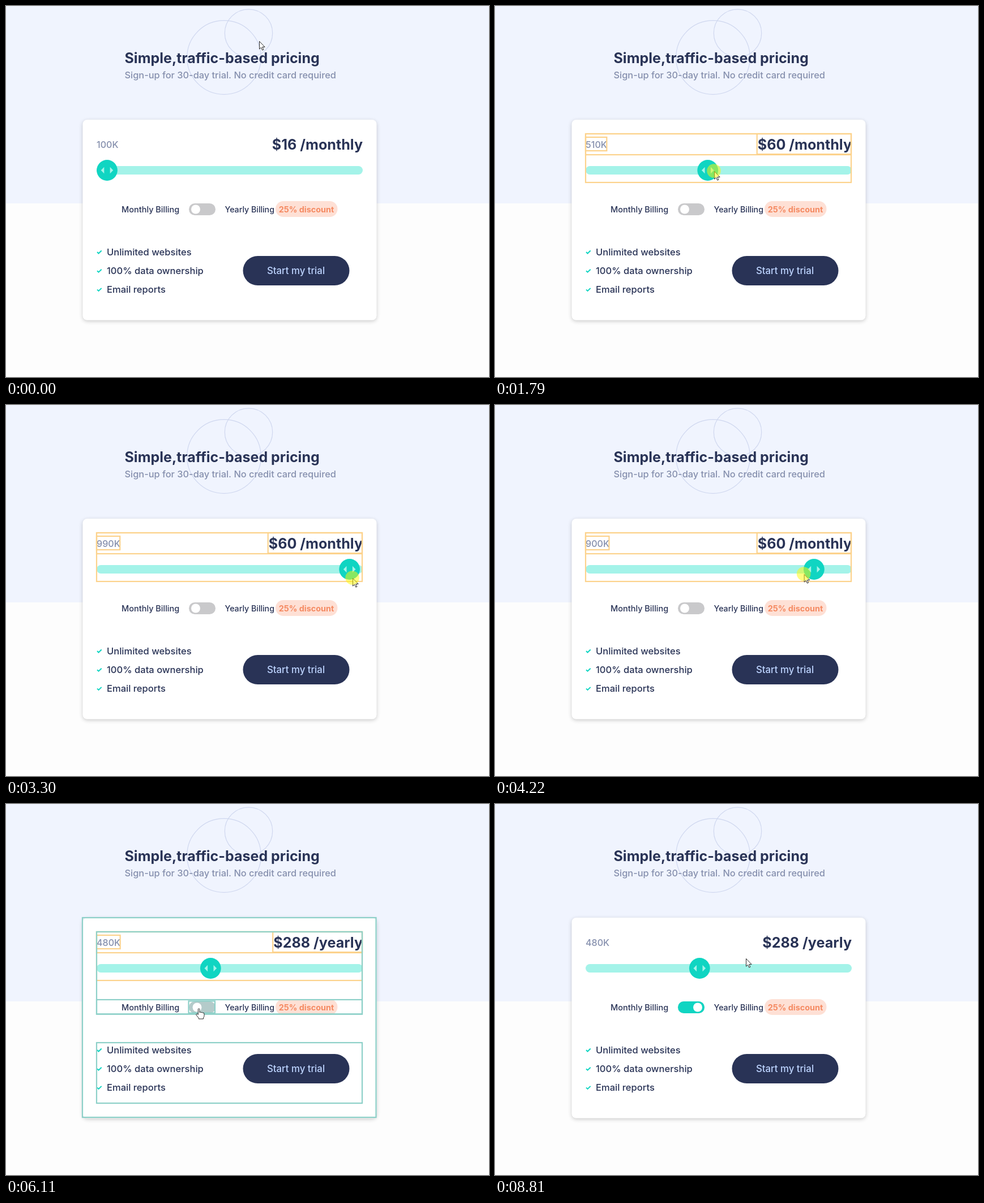
An HTML page with a canvas for the animation above (8.84 s loop, 853 by 656 pixels).

```html
<!DOCTYPE html>
<html lang="en">
<head>
<meta charset="utf-8">
<title>Pricing slider</title>
<style>
html, body { margin: 0; width: 100%; height: 100%; overflow: hidden; background: #fdfdfd; }
canvas { display: block; }
</style>
</head>
<body>
<canvas id="stage" width="853" height="656"></canvas>
<script>
const ctx = document.getElementById('stage').getContext('2d');
const LOOP = 8840;
const NAVY = '#293356', GREY = '#858fad', TEAL = '#10d5c2', PALE = '#a4f3e9';
const AMBER = '#fcd28c', MINT = '#8dd0c8';
const PRESS = 750, RELEASE = 5040, LAG = 55, CLEAR = 8690;
const CLICKS = [6070, 7160, 7740, 7990, 8240];

// pointer path: time, x, y
const PATH = [
  [0, 447, 62], [30, 447, 62], [150, 385, 112], [300, 242, 232], [440, 188, 287],
  [750, 188, 287], [1000, 217, 287], [1200, 257, 287], [1660, 365, 291], [1790, 387, 292],
  [1960, 387, 293], [2390, 513, 307], [2520, 516, 308], [2820, 562, 307],
  [3300, 612, 306], [3650, 632, 306], [3800, 632, 305], [4000, 612, 302],
  [4220, 546, 299], [4640, 400, 304], [4880, 376, 304], [4960, 376, 304], [5030, 362, 303],
  [5210, 362, 304], [5410, 340, 361], [8680, 340, 361], [8810, 443, 273]
];

const clamp = (v, a, b) => Math.min(b, Math.max(a, v));

function pointer(t) {
  let i = 1;
  while (i < PATH.length - 1 && PATH[i][0] < t) i++;
  const [t0, x0, y0] = PATH[i - 1], [t1, x1, y1] = PATH[i];
  const p = clamp((t - t0) / (t1 - t0), 0, 1);
  return [x0 + (x1 - x0) * p, y0 + (y1 - y0) * p];
}

function traffic(t) {
  if (t < PRESS) return 100;
  const x = t >= RELEASE ? 361.3 : pointer(t - LAG)[0];
  return clamp(Math.round((100 + (x - 178.5) / 0.4811) / 10) * 10, 100, 1000);
}

function toggleState(t) {
  const done = CLICKS.filter(c => c <= t);
  const on = done.length % 2 === 1;
  if (!done.length) return { on, pos: 0, lit: false };
  const since = t - done[done.length - 1];
  const p = clamp(since / 200, 0, 1);
  const e = p * p * (3 - 2 * p);
  return { on, pos: on ? e : 1 - e, lit: since < (done.length === 1 ? 360 : 265) };
}

function text(s, x, y, size, weight, color, align = 'left') {
  ctx.font = `${weight} ${size}px Inter, "Open Sans", sans-serif`;
  ctx.textAlign = align;
  ctx.fillStyle = color;
  ctx.fillText(s, x, y);
  return ctx.measureText(s).width;
}

function pill(x, y, w, h, r, color) {
  ctx.fillStyle = color;
  ctx.beginPath();
  ctx.roundRect(x, y, w, h, r);
  ctx.fill();
}

function disc(x, y, r, color) {
  ctx.fillStyle = color;
  ctx.beginPath();
  ctx.arc(x, y, r, 0, 7);
  ctx.fill();
}

function ring(x, y, r) {
  ctx.strokeStyle = '#cfd7ef';
  ctx.lineWidth = 1.2;
  ctx.beginPath();
  ctx.arc(x, y, r, 0, 7);
  ctx.stroke();
}

function frame(x0, y0, x1, y1, color) {
  ctx.strokeStyle = color;
  ctx.lineWidth = 2.2;
  ctx.strokeRect(x0, y0, x1 - x0, y1 - y0);
}

function poly(points, color) {
  ctx.fillStyle = color;
  ctx.beginPath();
  points.forEach(([x, y]) => ctx.lineTo(x, y));
  ctx.closePath();
  ctx.fill();
}

function page() {
  ctx.fillStyle = '#fdfdfd';
  ctx.fillRect(0, 0, 853, 656);
  ctx.fillStyle = '#f0f4fe';
  ctx.fillRect(0, 0, 853, 349);
  ring(385, 91, 65.3);
  ring(428.5, 48, 42.2);
  text('Simple,traffic-based pricing', 209.5, 101, 25, 700, NAVY);
  text('Sign-up for 30-day trial. No credit card required', 209.5, 128, 16.35, 450, GREY);

  ctx.save();
  ctx.shadowColor = 'rgba(0,0,0,.2)';
  ctx.shadowBlur = 7;
  ctx.shadowOffsetY = 2;
  pill(135.5, 201, 519, 354.5, 8, '#fff');
  ctx.restore();

  text('Monthly Billing', 204, 364.5, 14.5, 450, NAVY);
  text('Yearly Billing', 386.5, 364.5, 14.2, 450, NAVY);
  pill(476, 345, 109.5, 28, 14, '#fee0d5');
  text('25% discount', 530.5, 364.5, 14.4, 650, '#f58a62', 'center');

  ['Unlimited websites', '100% data ownership', 'Email reports'].forEach((s, i) => {
    const y = 435 + i * 33.2;
    ctx.strokeStyle = TEAL;
    ctx.lineWidth = 2;
    ctx.beginPath();
    ctx.moveTo(161, y);
    ctx.lineTo(163.5, y + 2.5);
    ctx.lineTo(168.7, y - 2.5);
    ctx.stroke();
    text(s, 178, y + 6, 16.55, 450, NAVY);
  });
  pill(418.5, 442, 188, 52, 26, NAVY);
  text('Start my trial', 512, 474, 16.8, 450, '#bdd4ff', 'center');
}

function slider(v) {
  const x = 178.5 + (v - 100) * 0.4811, y = 290.5;
  pill(160, 283, 470, 15, 7.5, PALE);
  disc(x, y, 18.4, TEAL);
  for (const s of [-1, 1])
    poly([[x + s * 10.8, y], [x + s * 5.2, y - 5.8], [x + s * 5.2, y + 5.8]], PALE);
}

function toggle(pos) {
  pill(323, 349, 47, 21, 10.5, '#c9c9cb');
  ctx.globalAlpha = pos;
  pill(323, 349, 47, 21, 10.5, TEAL);
  ctx.globalAlpha = 1;
  disc(335 + 23 * pos, 359.5, 8, '#fff');
}

const ARROW = new Path2D('M0 0V13.6L3.1 10.8L5.2 15.6L7.4 14.7L5.3 10H9.6Z');
const HAND = new Path2D('M-1.2 1Q0 -.8 1.4 1V7Q3 5.8 4.2 7.2Q5.8 6.2 7 7.8Q9.5 7 9.5 9.5V13' +
  'Q9.5 15 8 16.5V18.5H-.2V17L-4.6 11.4Q-5 9 -2.6 9.6L-1.2 11Z');

function cursor(shape, x, y) {
  ctx.save();
  ctx.translate(x + 0.5, y + 0.5);
  ctx.lineJoin = 'round';
  ctx.fillStyle = '#fff';
  ctx.strokeStyle = '#2a2a2a';
  ctx.lineWidth = 1;
  ctx.fill(shape);
  ctx.stroke(shape);
  ctx.restore();
}

function draw(t) {
  const v = traffic(t), sw = toggleState(t);
  const monthly = v < 250 ? 16 : v < 500 ? 32 : 60;
  const price = sw.on ? `$${monthly * 9} /yearly` : `$${monthly} /monthly`;
  page();
  const countW = text(v + 'K', 160, 251, 16.1, 450, GREY);
  const priceW = text(price, 630, 254, 25.1, 700, NAVY, 'right');
  slider(v);
  toggle(sw.pos);

  if (t >= PRESS && t < CLEAR) {
    frame(160, 226, 629, 312, AMBER);
    frame(160, 226, 629, 263, AMBER);
    frame(160, 232, 159.5 + countW, 256, AMBER);
    frame(629 - priceW, 226, 629, 262, AMBER);
  }
  if (sw.lit) {
    frame(135, 201, 653.5, 554, MINT);
    frame(160, 226, 629, 371.5, MINT);
    frame(160, 346, 629, 371.5, MINT);
    frame(322.5, 348.5, 369, 369.5, MINT);
    frame(160, 422, 629, 529, MINT);
  }

  const [x, y] = pointer(t);
  const overToggle = x > 323 && x < 370 && y > 349 && y < 370;
  cursor(overToggle ? HAND : ARROW, x, y);
  if (t >= PRESS && t < RELEASE) disc(x - 0.5, y - 0.5, 12.3, 'rgba(255,250,0,.5)');
}

const start = performance.now();
function tick() {
  draw((performance.now() - start) % LOOP);
  requestAnimationFrame(tick);
}
tick();
</script>
</body>
</html>
```
